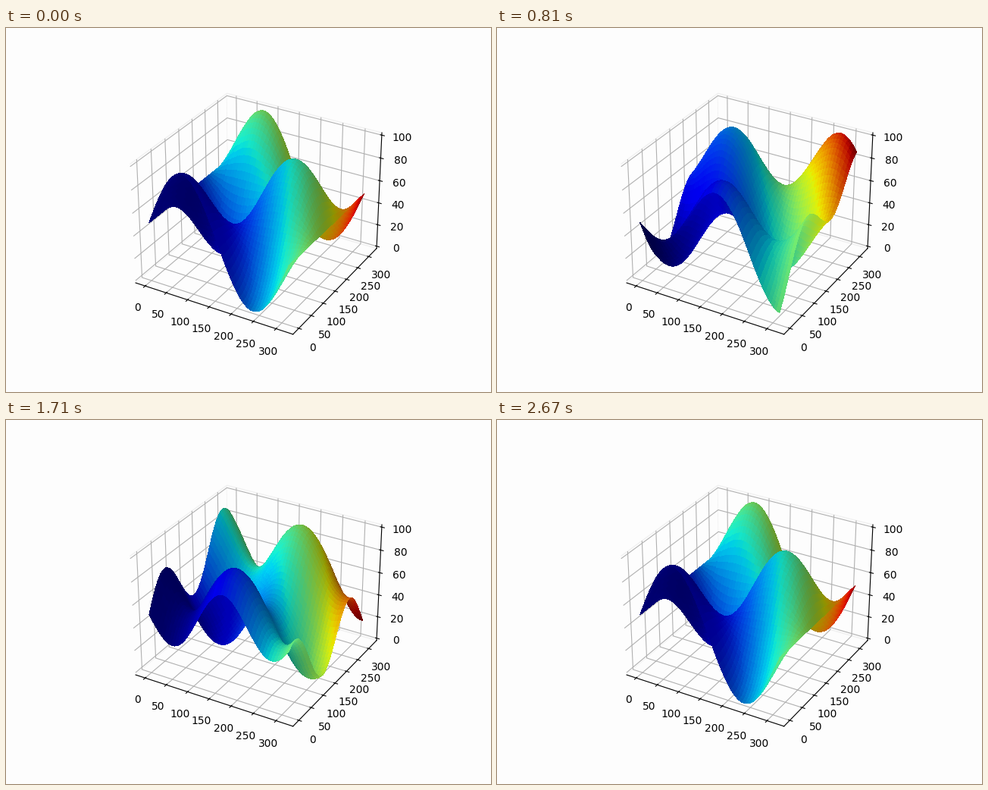
A matplotlib script that plays this animation: 640x480 px, repeating every 2700 ms.

```python
import numpy as np
import matplotlib.pyplot as plt
from matplotlib.animation import FuncAnimation

FRAMES = 90
INTERVAL = 30
SIDE = 100 * np.pi      # two half waves of sin(x / 50) per side
BACKGROUND = "#fdfdfd"
PANE_EDGE = "#f1f1f1"


def padded(low, high, margin):
    pad = (high - low) * margin
    return low - pad, high + pad


fig = plt.figure(figsize=(6.4, 4.8), dpi=100, facecolor=BACKGROUND)
ax = fig.add_subplot(projection="3d")
ax.set_facecolor(BACKGROUND)
ax.view_init(elev=30, azim=-60)

side_limits = padded(*padded(0, SIDE, 0.05), 1 / 48)
ax.set_xlim(*side_limits)
ax.set_ylim(*side_limits)
ax.set_zlim(*padded(0, 100, 1 / 48))
for axis in (ax.xaxis, ax.yaxis, ax.zaxis):
    axis.set_pane_color(BACKGROUND)
    axis.pane.set_edgecolor(PANE_EDGE)

line = np.linspace(0, SIDE, 50)
x, y = np.meshgrid(line, line)
colors = plt.get_cmap("jet")((x**2 + y**2) / (2 * SIDE**2))
surface = None


def height(angle):
    """Egg-crate wave turned about the origin."""
    u = x * np.cos(angle) - y * np.sin(angle)
    v = x * np.sin(angle) + y * np.cos(angle)
    return 50 + 50 * np.sin(u / 50) * np.cos(v / 50)


def update(frame):
    global surface
    if surface is not None:
        surface.remove()
    angle = 2 * np.pi * frame / (FRAMES - 1)
    surface = ax.plot_surface(x, y, height(angle), facecolors=colors,
                              linewidth=0, antialiased=False)
    return (surface,)


anim = FuncAnimation(fig, update, frames=FRAMES, interval=INTERVAL,
                     init_func=lambda: (), repeat=True, repeat_delay=0,
                     blit=False)
plt.show()
```
